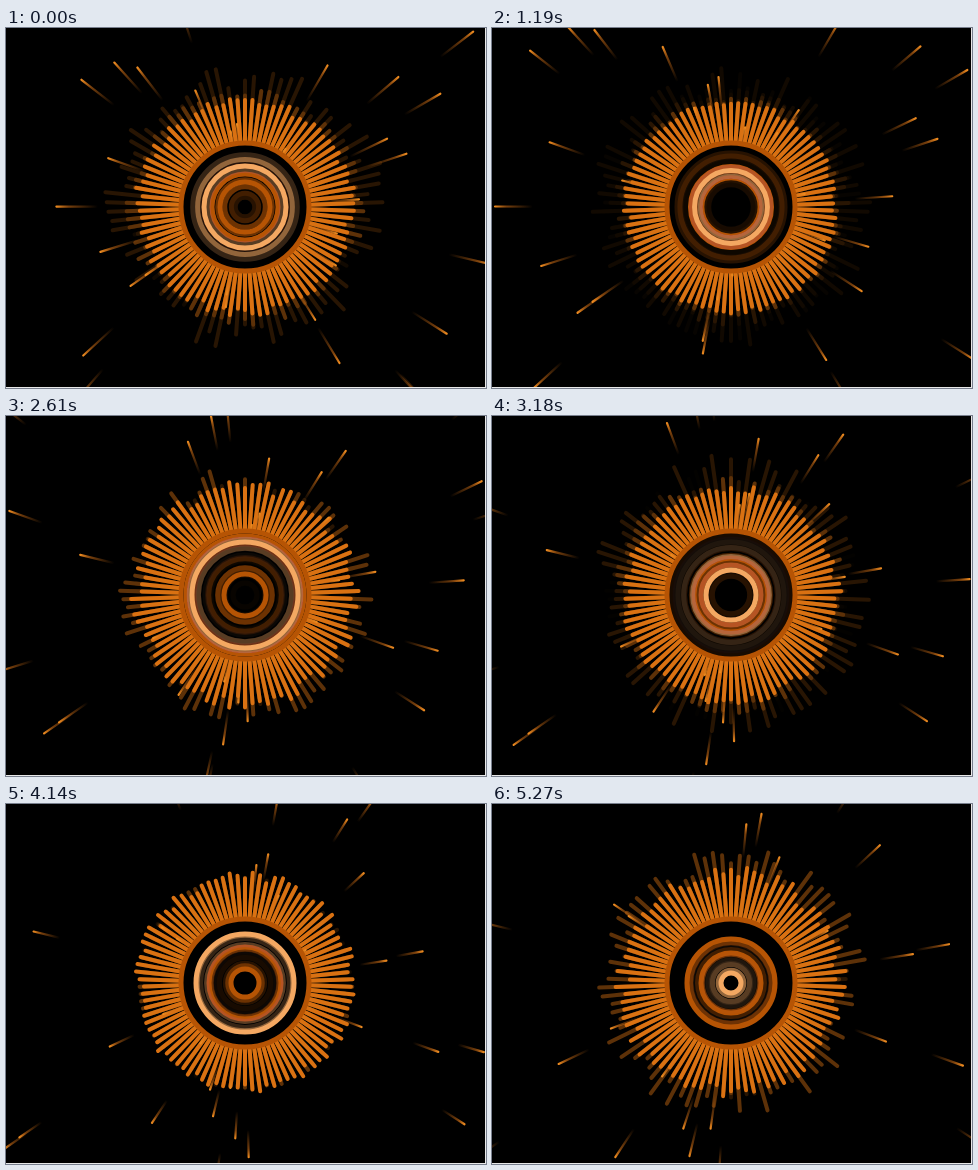
Write an HTML page with a canvas that moves like this. It is 480x360 px and loops after 5.36 s.

```html
<!DOCTYPE html>
<html lang="en">
<head>
<meta charset="utf-8">
<title>Radial visualizer</title>
<style>
  html, body { margin: 0; width: 100%; height: 100%; overflow: hidden; background: #e8e8e8; }
  canvas { display: block; width: 480px; height: 360px; }
</style>
</head>
<body>
<canvas id="stage" width="480" height="360"></canvas>
<script>
const ctx = document.getElementById('stage').getContext('2d');
const WIDTH = 479, HEIGHT = 359, CX = 239, CY = 179;
const LOOP = 5360, STEPS = 39, LEAD_IN = 28;
const BARS = 90, RIM = 64, SPARKS = 62, TRAIL = 6;
const BLACK = [0, 0, 0], ORANGE = [217, 113, 18], AMBER = [182, 84, 4], PALE = [244, 168, 98];

// Key steps, and the values that glide between them
const keys = [0, 5, 13, 19, 23, 30, 38];
const flown = [0, 32, 73, 105, 125, 153, 194];
const rings = [
  { color: AMBER, radius: [25, 54, 12, 59, 37, 14, 44] },
  { color: AMBER, radius: [33, 27, 34, 21, 30, 36, 30] },
  { color: PALE, radius: [41, 36, 40, 53, 25, 49, 10] }
];

// Beats: step and how far they push the bars out
const beats = [[-2, 38], [4, 30], [5, 35], [11, 12], [18, 24], [21, 35], [31, 18], [37, 31]];

const lerp = (a, b, p) => a + (b - a) * p;
const mix = (a, b, p) => `rgb(${a.map((v, i) => Math.round(lerp(v, b[i], p)))})`;
const rand = (i, k) => {
  const v = Math.sin(i * 12.9898 + k * 78.233 + 4.1) * 43758.5453;
  return v - Math.floor(v);
};

// Position of step k among the keys: segment and share of it
function locate(k) {
  let n = 0;
  while (n < keys.length - 2 && keys[n + 1] <= k) n++;
  return [n, (k - keys[n]) / (keys[n + 1] - keys[n])];
}

function glide(values, k) {
  const [n, p] = locate(k);
  return lerp(values[n], values[n + 1], p);
}

function circle(r, color) {
  ctx.beginPath();
  ctx.arc(CX, CY, r, 0, Math.PI * 2);
  ctx.lineWidth = 5;
  ctx.strokeStyle = color;
  ctx.stroke();
}

function ray(angle, from, to) {
  const c = Math.cos(angle), s = Math.sin(angle);
  ctx.moveTo(CX + c * from, CY + s * from);
  ctx.lineTo(CX + c * to, CY + s * to);
}

// Outer radius of the loudest bar
function level(k) {
  const push = beats.map(([at, size]) => size * (k < at ? .3 ** (at - k) : .35 ** (k - at)));
  return 108 + Math.max(...push);
}

function drawBars(k) {
  ctx.lineWidth = 4;
  for (let age = TRAIL; age >= 0; age--) {
    const at = k - age, top = level(at);
    const even = Math.min(.45, (top - 98) / 70);
    ctx.strokeStyle = mix(BLACK, ORANGE, .43 ** age);
    ctx.beginPath();
    for (let i = 0; i < BARS; i++) {
      const size = 1 - even * rand(i, at);
      ray((i * 4 - 90) * Math.PI / 180, RIM, lerp(RIM, top - 2, size));
    }
    ctx.stroke();
  }
}

// Sparks leave at an even spacing in random directions
function drawSparks(k) {
  const now = glide(flown, k), tail = now - glide(flown, k - TRAIL) + 3;
  ctx.lineWidth = 2.2;
  for (let i = 0; i < SPARKS; i++) {
    const angle = rand(i, 7) * Math.PI * 2;
    const head = 294 - i * 6.2 + now, end = Math.max(RIM, head - tail);
    if (head < RIM) continue;
    const c = Math.cos(angle), s = Math.sin(angle);
    const fade = ctx.createLinearGradient(CX + c * head, CY + s * head,
      CX + c * (head - tail), CY + s * (head - tail));
    fade.addColorStop(0, 'rgb(236 138 32)');
    fade.addColorStop(.3, 'rgb(217 115 22 / .55)');
    fade.addColorStop(1, 'rgb(217 115 22 / 0)');
    ctx.strokeStyle = fade;
    ctx.beginPath();
    ray(angle, end, head);
    ctx.stroke();
  }
}

// Rings jump about between the keys and leave fading afterimages
function drawRings(k) {
  ctx.globalCompositeOperation = 'lighten';
  for (let age = TRAIL; age >= 0; age--) {
    const at = k - age, stray = Math.sin(Math.PI * locate(at)[1]);
    rings.forEach(({ color, radius }, i) => {
      const r = glide(radius, at) + stray * lerp(-12, 12, rand(i, at));
      circle(Math.min(60, Math.max(10, r)), mix(BLACK, color, .6 ** age));
    });
  }
  ctx.globalCompositeOperation = 'source-over';
}

function draw(k) {
  ctx.fillStyle = '#000';
  ctx.fillRect(0, 0, WIDTH, HEIGHT);
  drawBars(k);
  drawSparks(k);
  ctx.beginPath();
  ctx.arc(CX, CY, RIM, 0, Math.PI * 2);
  ctx.fill();
  drawRings(k);
  circle(RIM, mix(BLACK, AMBER, 1));
}

ctx.beginPath();
ctx.rect(0, 0, WIDTH, HEIGHT);
ctx.clip();
ctx.lineCap = 'round';

let shown = -1;
function tick() {
  const t = performance.now() % LOOP;
  const k = Math.min(STEPS - 1, Math.floor((t + LEAD_IN) * STEPS / LOOP));
  if (k !== shown) draw(shown = k);
  requestAnimationFrame(tick);
}
tick();
</script>
</body>
</html>
```
